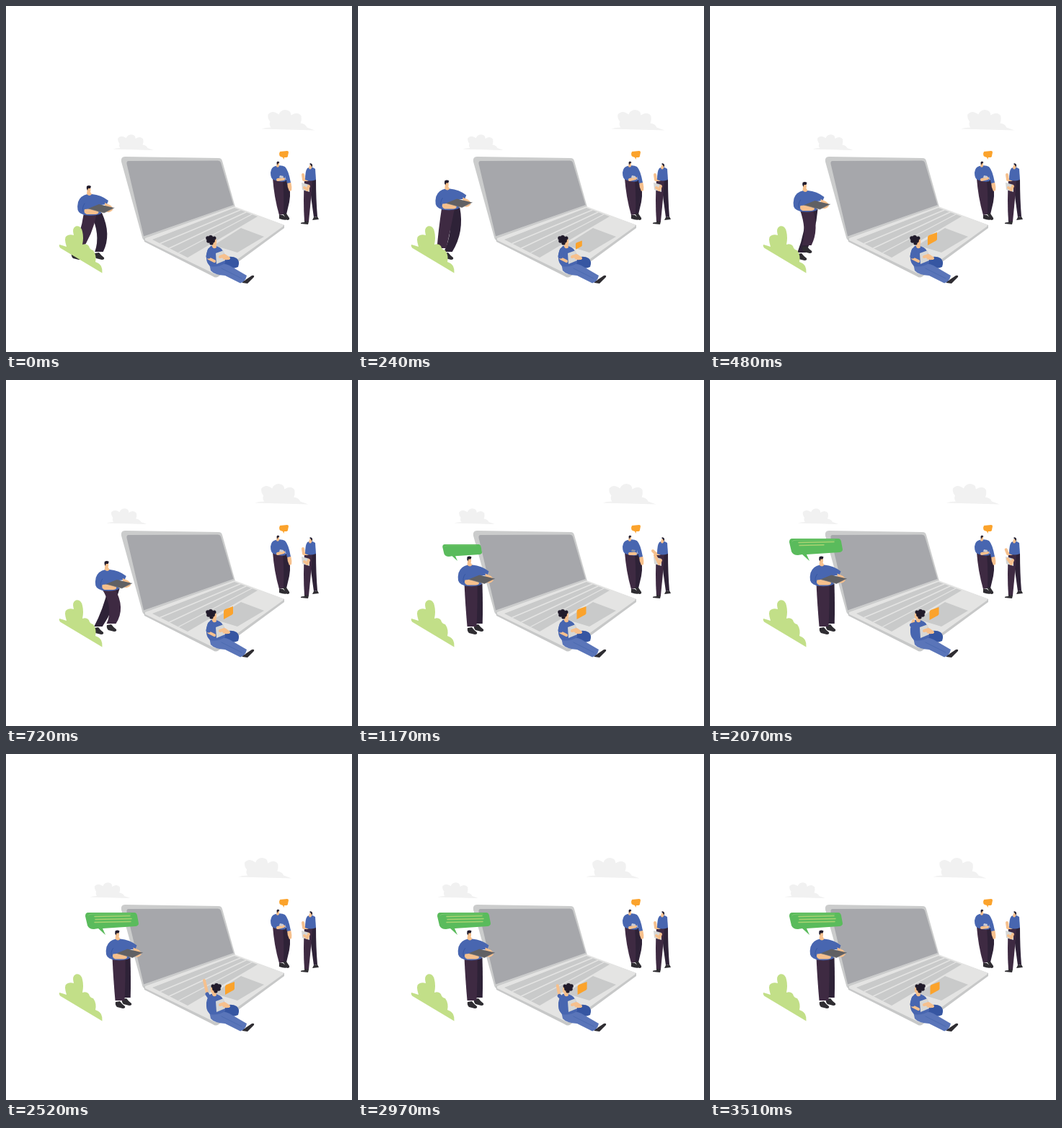
Animation, 480 px wide and 480 px high, one loop 3540 ms. Source, as an HTML page with a canvas:

```html
<!DOCTYPE html>
<html lang="en">
<head>
<meta charset="utf-8">
<title>Team around a laptop</title>
<style>
html, body { margin: 0; width: 100%; height: 100%; overflow: hidden; background: #fff; }
canvas { display: block; width: 480px; height: 480px; }
</style>
</head>
<body>
<canvas id="stage"></canvas>
<script>
const LOOP = 3540, STEP = 30;
const canvas = document.getElementById('stage');
const ctx = canvas.getContext('2d');
const dpr = window.devicePixelRatio || 1;
canvas.width = canvas.height = 480 * dpr;

const C = {
  skin: '#f6c08d', hair: '#211b2b', blue: '#4866b0', deep: '#3656a2', jeans: '#5a75b9',
  near: '#3e2a42', far: '#2e2237', shoe: '#2f2d32', orange: '#fba32c', green: '#5abb5c',
  line: '#a9d372', bush: '#c2df88', cloud: '#f1f1f1', paper: '#d6d7d6'
};

const mix = (a, b, k) => a + (b - a) * k;
const ease = k => k * k * (3 - 2 * k);
const ramp = (t, from, to) => Math.min(1, Math.max(0, (t - from) / (to - from)));

// Rows are [time, value, ...]; returns the eased values at t.
function track(t, rows) {
  let i = 0;
  while (i < rows.length - 2 && t >= rows[i + 1][0]) i++;
  const [a, b] = [rows[i], rows[i + 1]];
  const k = ease(ramp(t, a[0], b[0]));
  return a.slice(1).map((v, n) => mix(v, b[n + 1], k));
}

function fill(color, d) {
  ctx.fillStyle = color;
  ctx.fill(new Path2D(d));
}

function line(color, width, d) {
  ctx.strokeStyle = color;
  ctx.lineWidth = width;
  ctx.lineCap = ctx.lineJoin = 'round';
  ctx.stroke(new Path2D(d));
}

function at(x, y, sx, sy, draw) {
  ctx.save();
  ctx.translate(x, y);
  ctx.scale(sx, sy);
  draw();
  ctx.restore();
}

function cloud(x, y, s) {
  at(x, y, s, s, () => fill(C.cloud,
    'M0 0Q5 -2 13 -2Q10 -6 12 -10Q8 -15 9 -20Q15 -27 24 -20Q26 -26 33 -26.5Q41 -26 41 -19Q50 -25 55 -18Q56 -12 54 -8Q61 -7 63 -2L74 2Q40 1 0 0Z'));
}

function laptop() {
  fill('#cbcccc', 'M165 209L295 211Q299 211 300 215L318 279L193 325Q190 325 189 321L160 216Q159 209 165 209Z');
  fill('#a6a7ab', 'M170 215L294 214.5Q297 214.5 298 217L315.5 276L191 319.5L167.5 219Q167 215 170 215Z');
  fill('#c7c8c8', 'M191 322L317 279L386 304V308L295 375Q291 378 287 375L192 327Z');
  fill('#e4e4e3', 'M193 322L317 278L384 303Q386 304 384 306L294 371Q291 373 288 371L193 325Z');
  fill('#c9caca', 'M203 324L317 280L349 292L252 349Z');
  ctx.save();
  ctx.clip(new Path2D('M203 324L317 280L349 292L252 349Z'));
  for (let i = 1; i < 4; i++) {
    const k = i / 4;
    line('#e4e4e3', 1.4, `M${mix(201, 252, k)} ${mix(323, 349, k)}L${mix(317, 349, k)} ${mix(280, 292, k)}`);
  }
  ctx.restore();
  fill('#c9caca', 'M326 308L358 320L321 342L288 332Z');
}

function leg(color, hx, hy, ax, ay, bend, w) {
  const kx = (hx + ax) / 2 + bend, ky = (hy + ay) / 2 + 3, f = w * .36;
  fill(color, `M${hx - w / 2} ${hy}Q${kx - w * .45} ${ky} ${ax - f} ${ay}L${ax + f} ${ay}Q${kx + w * .48} ${ky} ${hx + w / 2} ${hy}Z`);
  at(ax, ay, 1, 1, () => fill(C.shoe, 'M-6 2L0 1Q3 5 7 8Q8 11 4 11L-4 9Q-7 6 -6 2Z'));
}

function walker(t) {
  const x = mix(115, 154.5, ramp(t, 0, 1150));
  const [y, ax, ay, abend, bx, by, bbend] = track(t, [
    [0, 249, 97, 341, 5, 129, 341, 12],
    [240, 241.5, 116, 336, -1, 125, 341, 11],
    [460, 244, 134, 332, 9, 127, 342, 5],
    [720, 251, 146, 338, 14, 128, 342, 3],
    [930, 243, 154, 340, 6, 147, 334, 6],
    [1150, 244.5, 158, 342, 0, 167, 338, 0],
    [LOOP, 244.5, 158, 342, 0, 167, 338, 0]
  ]);
  const hip = y + 38;
  leg(C.far, x + 10, hip, bx, by, bbend, 16);
  leg(C.near, x + 2, hip, ax, ay, abend, 18);
  at(x, y, 1, 1, () => {
    fill(C.blue, 'M-2 12Q-12 14 -15 23Q-18 36 -11 39L-6 41Q8 43 17 39L17 27L25 26L27 21Q17 13 4 12Z');
    line(C.deep, 1, 'M-6 25Q-10 31 -8 36');
    fill(C.skin, 'M-2 3L2 3Q3 6 2 9L4 12Q1 16 -3 12Z');
    fill(C.hair, 'M-3 1Q0 -1 3 1L2 4L-1 4L-2 7Q-4 4 -3 1Z');
    fill(C.skin, 'M-6 33Q3 31 13 36Q15 39 9 40L-3 40Q-8 38 -6 33Z');
    fill(C.skin, 'M22 24L29 27Q34 30 33 34Q29 39 23 36Z');
    fill('#606063', 'M-1 32L14 26L35 31L21 38Z');
    line('#77777a', .7, 'M-1 32L21 38L35 31');
  });
}

function bush() {
  fill(C.bush, 'M74 331Q78 332 84 334Q80 321 84 319Q88 316 94 318Q91 308 97 305.5Q104 304 106 313Q108 321 106 331Q112 329 115 333Q116 338 121 339Q126 346 124 355Q130 357 132 361Q134 365 133.5 370.5L75 335.5Q73 333 74 331Z');
}

function greenBubble(t) {
  const s = ease(ramp(t, 990, 1260));
  if (!s) return;
  at(138, 251, s, s, () => {
    fill(C.green, 'M-24 -31L40 -31Q43 -31 44 -27L46 -16Q46 -13 42 -12L-4 -9L0 0L-10 -9L-16 -8Q-23 -8 -25 -13L-28 -26Q-28 -31 -24 -31Z');
    line('#7fcb73', .8, 'M-24 -27Q-23 -29 -18 -29L35 -29');
    [[-15, 34, -25.5], [-14, 36, -21.5], [-15, 35, -17.5]].forEach(([x0, x1, y], i) => {
      const k = ramp(t, 1680 + i * 200, 1960 + i * 200);
      if (k) line(C.line, 1.5, `M${x0} ${y}L${mix(x0, x1, k)} ${y - k}`);
    });
  });
}

function chatter(t) {
  const [up] = track(t, [[0, .5], [240, 1], [720, 1], [1170, 0], [1680, 0], [2300, 1], [2700, 1], [LOOP, .5]]);
  fill(C.orange, 'M380 202L390 201Q392 201 392 203L391 208Q391 210 388 210L386 210L385.5 213L384 210L381 209Q379 208 379 205Z');
  fill(C.far, 'M380 241L391 241Q396 256 393 272L389 289L384 288Q386 270 380 250Z');
  fill(C.near, 'M370 239L384 242Q386 264 385 289L379 290Q372 266 370 239Z');
  fill(C.shoe, 'M384 288L389 288L393 294Q394 297 390 297ZM379 290L384 290L391 296Q387 298 379 295Z');
  fill(C.skin, 'M390 244L395 244Q397 251 396 256L393 257Q390 251 390 244Z');
  fill(C.blue, 'M374 222Q368 223 367 231Q367 239 371 241Q380 245 388 243L387 236L390 246L395 245Q392 228 387 223Q382 220 374 222Z');
  fill(C.skin, 'M376 218L379 218L379 222Q378 225 375 223Z');
  fill(C.hair, 'M375.5 217Q377 214 379.5 217L377 219L376 221Z');
  line(C.skin, 4, `M377 241L385 ${mix(241, 239, up)}`);
  fill(up > .25 ? '#c9cbd6' : '#8992ab', 'M380 235L385 236L384 239L379 238Z');
}

function listener(t) {
  const [up] = track(t, [[0, 1], [720, 1], [1100, 0], [1800, 0], [2300, 1], [LOOP, 1]]);
  fill(C.far, 'M421 241L430 241Q430 268 432 292L427 293Q423 268 421 241Z');
  fill(C.near, 'M414 242L425 242Q423 271 420 299L414 299Q412 270 414 242Z');
  fill(C.shoe, 'M427 293L432 292L434 296L425 297ZM414 298L420 299L419 303L409 302Q408 300 414 300Z');
  line(C.skin, 4, `M${mix(409, 412, up)} ${mix(237, 234, up)}L413 241L418 241`);
  fill(C.blue, 'M418 225Q424 222 429 226L430 241Q422 244 415 241Q415 229 418 225Z');
  fill(C.skin, 'M421 221L425 221L424 225Q422 228 420 225Z');
  fill(C.hair, 'M421 219Q423 217 425 220L425 224L423 221Z');
  fill(C.paper, 'M410 245L421 248L421 258L411 255Z');
  line(C.skin, 4, `M${mix(412, 414, up)} ${mix(243, 252, up)}L418 255L420 250`);
}

function note(t) {
  const s = track(t, [[0, 0], [60, 0], [350, 1], [LOOP, 1]])[0];
  if (!s) return;
  const [dx, dy] = track(t, [[0, 0, 0], [720, 0, 0], [1170, 1.5, 0], [1680, 3, 0], [2520, 2, 2], [LOOP, 3.5, 2]]);
  at(302 + dx, mix(350, 332, s) + dy, s, s, () => fill(C.orange, 'M0 0L0 -11Q0 -13 2 -14L13 -18L13 -8Q12 -6 9 -5Z'));
}

function sitter(t) {
  const turn = mix(1, -1, ease(ramp(t, 1350, 1590)));
  const [raise] = track(t, [[0, 0], [1890, 0], [2250, 1], [2880, 1], [3210, 0], [LOOP, 0]]);
  const wave = raise * Math.sin((t - 2520) / 110) * 1.5;

  fill(C.deep, 'M299 351Q312 345 320 350Q325 354 322 362Q314 366 300 362Z');
  fill(C.shoe, 'M332 380L341 374Q345 373 344 376L335 385L331 384ZM326 379L332 381L335 385L328 384Z');
  fill(C.jeans, 'M282 357Q300 355 310 360L334 374Q332 383 325 384.5L304 374Q289 373 284 367Z');
  line('#4a69ae', .8, 'M299 364L327 378');
  fill(C.blue, 'M284 333Q277 339 278 350Q278 356 283 361Q293 363 304 357Q305 344 299 337Q292 331 284 333Z');
  fill(C.skin, 'M286 329L291 329L292 335Q288 338 286 334Z');
  at(288, 325, turn, 1, () => {
    fill(C.skin, 'M-2 -2L3 -3Q5 1 4 5Q2 8 -1 5Z');
    ctx.fillStyle = C.hair;
    ctx.beginPath();
    for (const [x, y, r] of [[-8, -3, 2.8], [-4, -4, 3], [-7, 1, 2.8], [-2, 0, 4], [1, -3, 2.5], [-3, 4, 2.6]]) {
      ctx.moveTo(x + r, y);
      ctx.arc(x, y, r, 0, 7);
    }
    ctx.fill();
  });
  fill(C.paper, 'M291 343L302 339L304 353L292 358Z');
  line(C.skin, 4, 'M297 348L303 346L309 350');
  fill(C.skin, 'M299 347Q307 346 311 350Q308 354 301 351Z');

  const ex = mix(281, 279, raise), ey = mix(350, 331, raise);
  const hx = mix(289, 275 + wave, raise), hy = mix(354, 314, raise);
  line(C.skin, 4, `M${ex} ${ey}L${hx} ${hy}`);
  line(C.blue, mix(7, 5, raise), `M283 339L${ex} ${mix(347, 333, raise)}`);
  note(t);
}

function draw(t) {
  ctx.setTransform(dpr, 0, 0, dpr, 0, 0);
  ctx.fillStyle = '#fff';
  ctx.fillRect(0, 0, 480, 480);
  const drift = -45 * t / 3510;
  cloud(354.5 + drift, 170.5, 1);
  cloud(148.5 + drift, 198.5, .76);
  laptop();
  chatter(t);
  listener(t);
  walker(t);
  bush();
  greenBubble(t);
  sitter(t);
}

const start = performance.now();
function tick() {
  const t = (performance.now() - start) % LOOP;
  draw(Math.floor(t / STEP) * STEP);
  requestAnimationFrame(tick);
}
tick();
</script>
</body>
</html>
```
